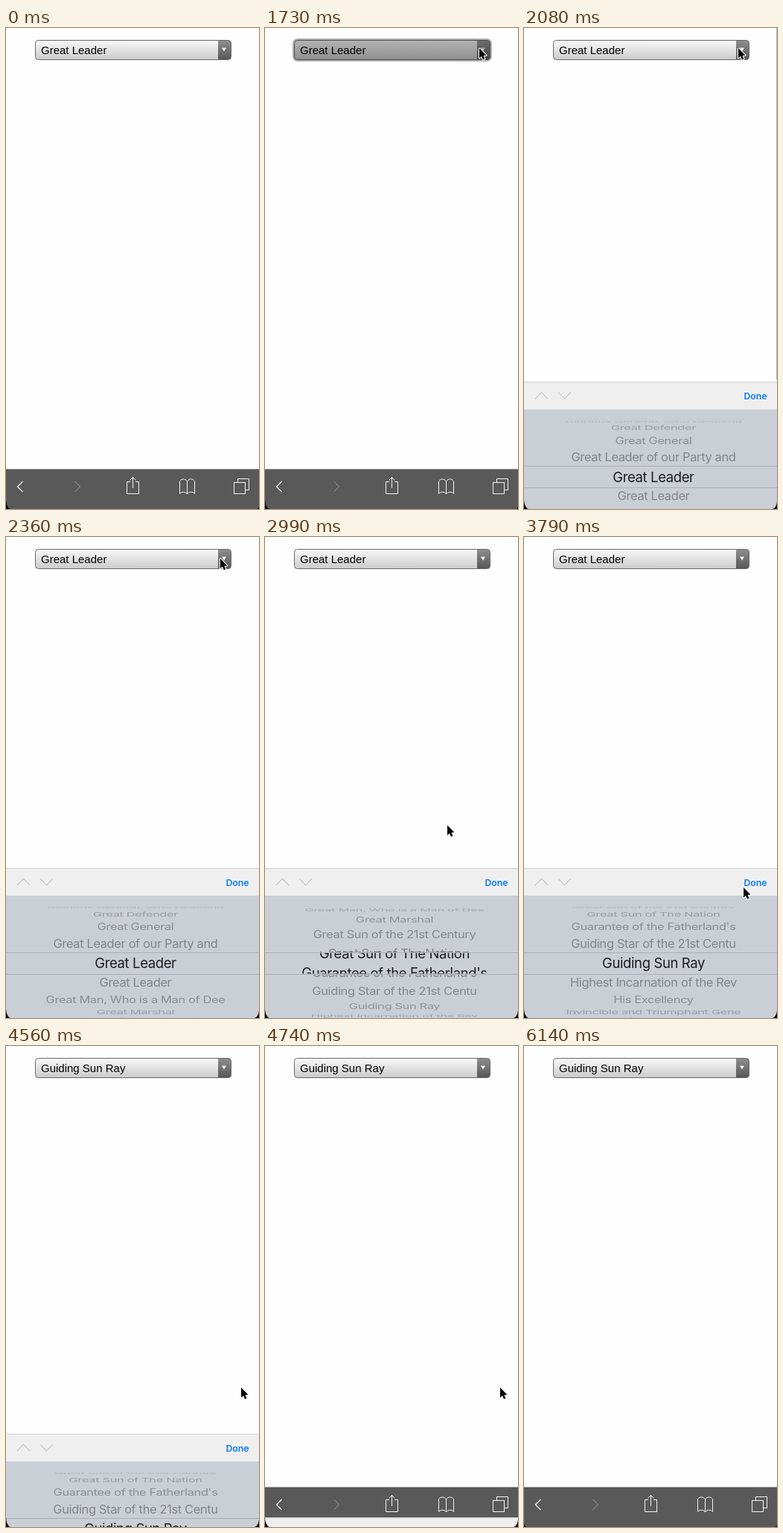
An HTML page with a canvas that plays this animation: 340x645 px, repeating every 6.2 s.

```html
<!DOCTYPE html>
<html lang="en">
<head>
<meta charset="utf-8">
<title>Select picker</title>
<style>
  html, body { margin: 0; width: 340px; height: 645px; overflow: hidden; background: #fefefe; }
  canvas { display: block; }
</style>
</head>
<body>
<canvas id="stage" width="340" height="645"></canvas>
<script>
const ctx = document.getElementById('stage').getContext('2d');
const LOOP = 6200, W = 340, H = 645, PANEL_TOP = 444;
const ROW_ANGLE = 20.3 * Math.PI / 180, RADIUS = 75;
const UI_FONT = 'Inter, Roboto, sans-serif';

const titles = [
  'Glorious General, Who Descend', 'Great Defender', 'Great General',
  'Great Leader of our Party and', 'Great Leader', 'Great Leader',
  'Great Man, Who is a Man of Dee', 'Great Marshal',
  'Great Sun of the 21st Century', 'Great Sun of The Nation',
  "Guarantee of the Fatherland's", 'Guiding Star of the 21st Centu',
  'Guiding Sun Ray', 'Highest Incarnation of the Rev', 'His Excellency',
  'Invincible and Triumphant Gene', 'Leader of the 21st Century'
];

// Cursor keys: time, x, y
const path = [
  [420, 331, 131], [540, 308, 80], [720, 286, 26], [949, 286, 26], [950, 288, 27],
  [2360, 288, 27], [2640, 244, 533], [2820, 244, 533], [2990, 245, 387],
  [3050, 245, 350], [3510, 245, 352], [3790, 295, 470], [4080, 316, 458],
  [5040, 316, 458], [5100, 332, 460]
];

const clamp = v => Math.min(1, Math.max(0, v));
const easeOut = (t, from, to, power) => 1 - (1 - clamp((t - from) / (to - from))) ** power;

function cursorAt(t) {
  if (t < path[0][0] || t >= 5100) return null;
  const i = path.findIndex(k => k[0] > t);
  const [t0, x0, y0] = path[i - 1], [t1, x1, y1] = path[i];
  const u = (t - t0) / (t1 - t0);
  return [x0 + (x1 - x0) * u, y0 + (y1 - y0) * u];
}

// The wheel follows the drag, then coasts to rest.
function scrollAt(t) {
  if (t < 2820) return 4;
  if (t < 3050) return 4 + (533 - cursorAt(t)[1]) / 26.6;
  return 10.88 + 1.12 * easeOut(t, 3050, 3700, 2.5);
}

function panelY(t) {
  const travel = H - PANEL_TOP;
  return t < 4440
    ? H - travel * easeOut(t, 1880, 2310, 3)
    : PANEL_TOP + travel * easeOut(t, 4480, 4800, 1.63);
}

function line(points, color, width = 1.2) {
  ctx.beginPath();
  points.forEach(([x, y]) => ctx.lineTo(x, y));
  ctx.strokeStyle = color;
  ctx.lineWidth = width;
  ctx.stroke();
}

function polygon(points, color) {
  ctx.beginPath();
  points.forEach(([x, y]) => ctx.lineTo(x, y));
  ctx.closePath();
  ctx.fillStyle = color;
  ctx.fill();
}

function rect(x, y, w, h, color) {
  ctx.fillStyle = color;
  ctx.fillRect(x, y, w, h);
}

function text(str, x, y, font, color, align = 'center', spacing = 0) {
  ctx.font = font;
  ctx.letterSpacing = spacing + 'px';
  ctx.textAlign = align;
  ctx.textBaseline = 'alphabetic';
  ctx.fillStyle = color;
  ctx.fillText(str, x, y);
}

function vertical(y0, y1, ...colors) {
  const g = ctx.createLinearGradient(0, y0, 0, y1);
  colors.forEach((c, i) => g.addColorStop(i / (colors.length - 1), c));
  return g;
}

function drawSelect(label, pressed) {
  ctx.save();
  ctx.beginPath();
  ctx.roundRect(39.5, 16.5, 263, 26, 4);
  if (pressed) {
    ctx.strokeStyle = '#b4b4b4';
    ctx.lineWidth = 5;
    ctx.stroke();
  }
  ctx.fillStyle = pressed ? vertical(17, 43, '#b2b2b2', '#8e8e8e') : vertical(17, 43, '#f8f8f8', '#cacaca');
  ctx.fill();
  ctx.save();
  ctx.clip();
  rect(285, 16, 18, 28, pressed ? vertical(17, 43, '#6c6c6c', '#434343') : vertical(17, 43, '#8e8e8e', '#555'));
  ctx.restore();
  ctx.strokeStyle = pressed ? '#4c4c4c' : '#696969';
  ctx.lineWidth = 1;
  ctx.stroke();
  ctx.restore();
  polygon([[290, 26.5], [296, 26.5], [293, 31.5]], pressed ? '#aaa' : '#f4f4f4');
  text(label, 47, 35, '15px "Liberation Sans", Arial, sans-serif', '#000', 'left');
}

function drawToolbar() {
  const white = '#f2f2f2';
  rect(0, 591.5, W, 54, '#595959');
  line([[22.5, 608], [15.5, 615], [22.5, 622]], white, 1.4);
  line([[92.5, 608], [99.5, 615], [92.5, 622]], '#818181', 1.2);
  // Share
  line([[167, 608.5], [162.5, 608.5], [162.5, 624.5], [178.5, 624.5], [178.5, 608.5], [174, 608.5]], white, 1);
  line([[170.5, 617], [170.5, 602.5]], white, 1);
  line([[166.5, 606.5], [170.5, 602.5], [174.5, 606.5]], white, 1);
  // Book
  ctx.beginPath();
  for (const s of [-1, 1]) {
    ctx.moveTo(243.5, 608);
    ctx.bezierCurveTo(243.5 + s * 2, 604, 243.5 + s * 8, 604, 243.5 + s * 10, 607.5);
    ctx.lineTo(243.5 + s * 10, 624.5);
    ctx.bezierCurveTo(243.5 + s * 8, 621.5, 243.5 + s * 2, 621.5, 243.5, 625);
  }
  ctx.moveTo(243.5, 608);
  ctx.lineTo(243.5, 625);
  ctx.strokeStyle = white;
  ctx.stroke();
  // Tabs
  ctx.strokeRect(306.5, 609.5, 15, 15);
  line([[311.5, 609], [311.5, 604.5], [326.5, 604.5], [326.5, 619.5], [322, 619.5]], white, 1);
}

function drawRows(center, scroll, size, spacing, color, fade) {
  titles.forEach((title, i) => {
    const angle = (i - scroll) * ROW_ANGLE;
    if (Math.abs(angle) > 1.5) return;
    const depth = Math.cos(angle);
    ctx.save();
    ctx.translate(W / 2 + 4, center + RADIUS * Math.sin(angle));
    ctx.scale(1, depth);
    ctx.globalAlpha = fade ? depth ** 0.6 : 1;
    text(title, 0, size * 0.36, `${size}px ${UI_FONT}`, color, 'center', spacing);
    ctx.restore();
  });
}

function clipped(boxes, draw) {
  ctx.save();
  ctx.beginPath();
  boxes.forEach(([y, h]) => ctx.rect(0, y, W, h));
  ctx.clip();
  draw();
  ctx.restore();
}

function drawPanel(y, scroll) {
  const center = y + 127.5, bandTop = y + 112.5, bandHeight = 29;
  rect(0, y, W, 37, '#efefef');
  rect(0, y, W, 1, '#cfcfcf');
  line([[15, y + 23], [23.5, y + 14], [32, y + 23]], '#c8c8c8');
  line([[46, y + 14], [54.5, y + 23], [63, y + 14]], '#c8c8c8');
  text('Done', 311, y + 23.5, `600 12.3px ${UI_FONT}`, '#0b7bf8');
  rect(0, y + 37, W, H, '#caced5');
  clipped([[y + 37, 75.5], [bandTop + bandHeight, 80]],
    () => drawRows(center, scroll, 16.4, -0.34, '#7f8287', true));
  clipped([[bandTop, bandHeight]],
    () => drawRows(center, scroll, 18.5, -0.38, '#1c1d20', false));
  for (const edge of [bandTop, bandTop + bandHeight])
    line([[0, Math.round(edge) + 0.5], [W, Math.round(edge) + 0.5]], '#adb0b6', 1);
}

function corner(x, dir, w, h) {
  ctx.beginPath();
  ctx.moveTo(x, H - h);
  ctx.quadraticCurveTo(x + dir * w * 0.15, H - h * 0.15, x + dir * w, H);
  ctx.lineTo(x, H);
  ctx.fillStyle = '#0a0a0a';
  ctx.fill();
}

function drawCursor([x, y]) {
  const shape = [[0, 0], [0, 13.5], [3, 10.8], [5, 15.5], [7.4, 14.4], [5.4, 10], [9.4, 9.6]]
    .map(([dx, dy]) => [x + dx, y + dy]);
  ctx.lineJoin = 'round';
  line([...shape, shape[0]], '#fff', 2.2);
  polygon(shape, '#000');
  ctx.lineJoin = 'miter';
}

function render(t) {
  rect(0, 0, W, H, '#fefefe');
  drawSelect(t < 4440 ? 'Great Leader' : 'Guiding Sun Ray', t >= 1730 && t < 1840);
  drawToolbar();
  const y = panelY(t), open = y < H;
  if (t >= 1880 && t < 2360) rect(339, 0, 1, y - 3, '#b2b2b2');
  if (open) drawPanel(y, scrollAt(t));
  const late = t >= 6140;
  corner(0, 1, late ? 4 : 6, late ? 5 : 12);
  corner(W, -1, open ? 6 : 3, open ? 10 : 3);
  const cursor = cursorAt(t);
  if (cursor) drawCursor(cursor);
}

const start = performance.now();
function tick() {
  render((performance.now() - start) % LOOP);
  requestAnimationFrame(tick);
}
tick();
</script>
</body>
</html>
```
